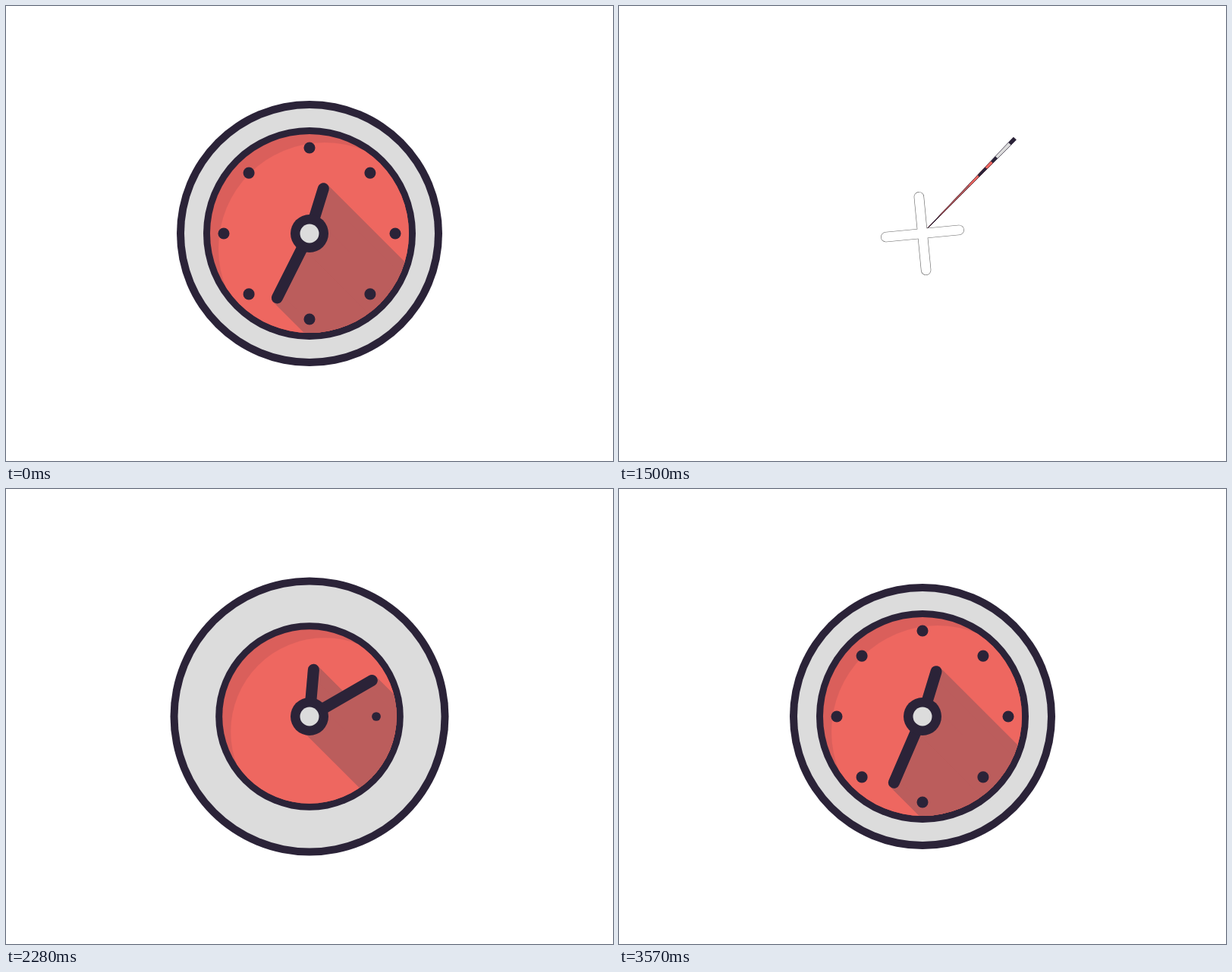
An HTML page with a canvas that plays this animation: 800x600 px, repeating every 3600 ms.

```html
<!DOCTYPE html>
<html lang="en">
<head>
<meta charset="utf-8">
<title>Clock</title>
<style>
  html, body { margin: 0; width: 100%; height: 100%; overflow: hidden; background: #fff; }
  canvas { display: block; }
</style>
</head>
<body>
<canvas id="stage" width="800" height="600"></canvas>
<script>
const ctx = document.getElementById('stage').getContext('2d');
const LOOP = 3600, STEP = 30, BIRTH = 1650, FAR = 400;
const DARK = '#2b2338', GREY = '#dcdcdc', RED = '#ee6760', RIM = '#da5f5b', SHADE = '#bb5d5c';
const WIPE_START = 873, WIPE_TIME = 653, WIPE_ANGLE = 45;

const rad = deg => deg * Math.PI / 180;
const progress = (t, start, end) => Math.min(1, Math.max(0, (t - start) / (end - start)));
const smooth = p => p * p * (3 - 2 * p);
const polar = (deg, r) => [r * Math.sin(rad(deg)), -r * Math.cos(rad(deg))];

function disc(x, y, r, fill) {
  ctx.beginPath();
  ctx.arc(x, y, Math.max(0, r), 0, 2 * Math.PI);
  ctx.fillStyle = fill;
  ctx.fill();
}

function ring(r, fill) {
  disc(0, 0, r + Math.min(5, r), DARK);
  disc(0, 0, r - 5, fill);
}

function line(from, to, width, color) {
  ctx.beginPath();
  ctx.moveTo(...from);
  ctx.lineTo(...to);
  ctx.lineWidth = width;
  ctx.strokeStyle = color;
  ctx.stroke();
}

function handShadow([x, y]) {
  ctx.beginPath();
  ctx.moveTo(0, 0);
  ctx.lineTo(x, y);
  ctx.lineTo(x + FAR, y + FAR);
  ctx.lineTo(FAR, FAR);
  ctx.closePath();
  ctx.fillStyle = ctx.strokeStyle = SHADE;
  ctx.lineWidth = 15;
  ctx.fill();
  ctx.stroke();
}

function face(r, tips, hub) {
  ctx.save();
  ctx.beginPath();
  ctx.arc(0, 0, Math.max(0, r - 4), 0, 2 * Math.PI);
  ctx.clip();
  disc(0, 0, r, RIM);
  disc(20, 20, r + 5, RED);
  if (hub > 0) {
    tips.forEach(handShadow);
    line([0, 0], [FAR, FAR], 40 * hub, SHADE);
  }
  ctx.restore();
}

// t runs from the birth of the clock to the end of its wipe
function clock(t) {
  const rise = 1 - (1 - progress(t, BIRTH, 1920)) ** 2;
  const outer = 204 * rise - 34 * progress(t, 1920, 2400);
  const inner = 135 * smooth(progress(t, 1845, 2400));
  const hub = smooth(progress(t, 1900, 2200));
  const reach = smooth(progress(t, 1980, 2270));
  const minute = (t - 1740) / 9;
  const tips = [polar(minute / 12, 62 * reach), polar(minute, 95 * reach)];

  ring(outer, GREY);
  if (inner > 0) {
    ring(inner, RED);
    face(inner, tips, hub);
  }
  for (let k = 0; k < 8; k++) {
    const age = t - 2280 - 39 * k;
    if (age < -15) continue;
    const dist = Math.min(113, 88 + age * 0.052);
    disc(...polar(90 + 45 * k, dist), dist / 15, DARK);
  }
  if (reach > 0) tips.forEach(tip => line([0, 0], tip, 15, DARK));
  disc(0, 0, 25 * hub, DARK);
  disc(0, 0, 12.5 * hub, GREY);
}

function wipedClock(t) {
  const cut = WIPE_ANGLE + 360 * smooth(progress(t, WIPE_START, WIPE_START + WIPE_TIME));
  ctx.save();
  ctx.beginPath();
  ctx.moveTo(0, 0);
  ctx.arc(0, 0, FAR, rad(cut - 90), rad(WIPE_ANGLE + 270));
  ctx.clip();
  clock(t + LOOP);
  ctx.restore();
  for (const edge of [WIPE_ANGLE, cut]) line([0, 0], polar(edge, 174), 0.6, DARK);
}

function cross(t) {
  const arm = 48.5 * Math.sin(Math.PI * progress(t, 1380, 1620));
  if (arm <= 0.01) return;
  ctx.save();
  ctx.rotate(rad(-5.5));
  for (const [width, color] of [[13.4, '#666'], [12.2, '#fff']]) {
    line([0, -arm], [0, arm], width, color);
    line([-arm, 0], [arm, 0], width, color);
  }
  ctx.restore();
}

function draw(now) {
  const t = Math.floor(now % LOOP / STEP) * STEP;
  ctx.setTransform(1, 0, 0, 1, 0, 0);
  ctx.fillStyle = '#fff';
  ctx.fillRect(0, 0, 800, 600);
  ctx.translate(400, 300);
  ctx.lineCap = ctx.lineJoin = 'round';
  if (t <= WIPE_START) clock(t + LOOP);
  else if (t < WIPE_START + WIPE_TIME) wipedClock(t);
  else if (t > BIRTH) clock(t);
  if (t < BIRTH) cross(t);
}

function tick() {
  draw(performance.now());
  requestAnimationFrame(tick);
}
tick();
</script>
</body>
</html>
```
